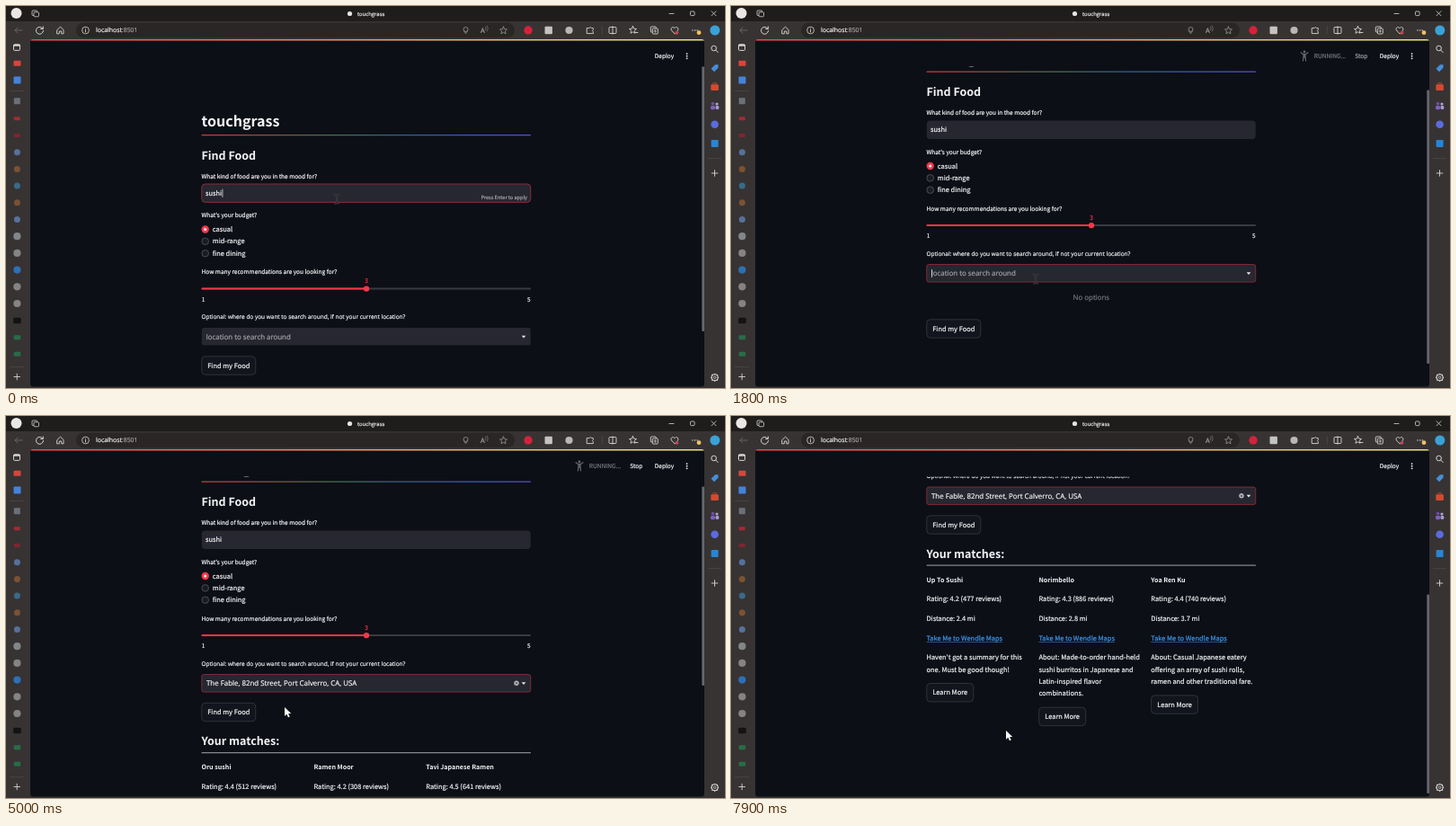
An HTML page with a canvas that plays this animation: 800x425 px, repeating every 8000 ms.

```html
<!DOCTYPE html>
<html lang="en">
<head>
<meta charset="utf-8">
<title>touchgrass</title>
<style>
html, body { margin: 0; width: 100%; height: 100%; overflow: hidden; background: #0c0f16; }
canvas { display: block; width: 800px; height: 425px; }
</style>
</head>
<body>
<canvas id="stage"></canvas>
<script>
const W = 800, H = 425, LOOP = 8000, STEP = 100;
const canvas = document.getElementById('stage');
const dpr = window.devicePixelRatio || 1;
canvas.width = W * dpr;
canvas.height = H * dpr;
const c = canvas.getContext('2d');

const BG = '#0c0f16', FIELD = '#262730', RED = '#f5374a', TEXT = '#f4f4f6', GREY = '#a3a5ab';
const FOCUS = '#a8303e', BAR = '#373333';
const LEFT = 217.5, WIDE = 366.5, VIEW_TOP = 38, VIEW = 387;

// ---------- drawing helpers ----------
function box(x, y, w, h, r, fill, stroke, lw = 1) {
  c.beginPath();
  c.roundRect(x, y, w, h, r);
  if (fill) { c.fillStyle = fill; c.fill(); }
  if (stroke) { c.strokeStyle = stroke; c.lineWidth = lw; c.stroke(); }
}
function dot(x, y, r, fill, stroke, lw = 1) {
  c.beginPath();
  c.arc(x, y, r, 0, Math.PI * 2);
  if (fill) { c.fillStyle = fill; c.fill(); }
  if (stroke) { c.strokeStyle = stroke; c.lineWidth = lw; c.stroke(); }
}
// Paths are SVG strings placed at x, y
function shape(d, x, y, fill, stroke, lw = 1) {
  c.save();
  c.translate(x, y);
  const p = new Path2D(d);
  c.lineJoin = c.lineCap = 'round';
  if (stroke) { c.strokeStyle = stroke; c.lineWidth = lw; c.stroke(p); }
  if (fill) { c.fillStyle = fill; c.fill(p); }
  c.restore();
}
// Text whose capitals are centred on y; regular weight gets a hairline to hold up at small sizes
function put(s, x, y, size, color, font, weight, align) {
  c.font = `${weight} ${size}px ${font}`;
  c.textAlign = align;
  c.fillStyle = c.strokeStyle = color;
  c.fillText(s, x, y);
  if (weight < 600) {
    c.lineWidth = 0.2;
    c.lineJoin = 'round';
    c.strokeText(s, x, y);
  }
}
function text(s, x, y, size = 7.98, color = TEXT, weight = 400, align = 'left') {
  put(s, x, y + size * 0.33, size / (weight < 600 ? 1.07 : 1.118), color,
    '"Noto Sans CJK JP", "Noto Sans CJK SC", sans-serif', weight, align);
}
function ui(s, x, y, size = 7.9, color = TEXT, align = 'left') {
  put(s, x, y + size * 0.35, size, color, '"Open Sans", "Noto Sans", sans-serif', 400, align);
}
function gradient(x, w, colors) {
  const g = c.createLinearGradient(x, 0, x + w, 0);
  colors.forEach((k, i) => g.addColorStop(i / (colors.length - 1), k));
  return g;
}
const clamp = u => Math.max(0, Math.min(1, u));
const ease = u => { u = clamp(u); return u * u * u * (u * (6 * u - 15) + 10); };

// ---------- content ----------
const QUERY = 'the fable';
const OPTIONS = [
  'The Fable, 82nd Street, Port Calverro, CA, USA',
  'The Fable Massage, Vanoti Road, Umber City, CA, USA',
  'The Fable Island, Orra, Velan',
  'The Fable Lounge, Thistle Hill Road, San Pelo, CA, USA'
];
const FIRST = [
  { name: 'Oru sushi', rate: '4.4 (512 reviews)' },
  { name: 'Ramen Moor', rate: '4.2 (308 reviews)' },
  { name: 'Tavi Japanese Ramen', rate: '4.5 (641 reviews)' }
];
const SECOND = [
  { name: 'Up To Sushi', rate: '4.2 (477 reviews)', far: '2.4',
    about: ["Haven't got a summary for this", 'one. Must be good though!'] },
  { name: 'Norimbello', rate: '4.3 (886 reviews)', far: '2.8',
    about: ['About: Made-to-order hand-held', 'sushi burritos in Japanese and', 'Latin-inspired flavor', 'combinations.'] },
  { name: 'Yoa Ren Ku', rate: '4.4 (740 reviews)', far: '3.7',
    about: ['About: Casual Japanese eatery', 'offering an array of sushi rolls,', 'ramen and other traditional fare.'] }
];

// ---------- timeline ----------
const AT = { focus: 1600, run: 1700, first: 2500, type: 2300, list: 4000, pick: 4900, second: 5800, scroll: 7250 };
const POINTER = [
  [0, 368, 215, 'beam'], [400, 368, 215, 'beam'], [700, 362, 238, 'arrow'], [900, 354, 271, 'hand'],
  [1200, 354, 271, 'arrow'], [1500, 339, 304, 'beam'], [3800, 339, 304, 'beam'], [4100, 337, 285, 'arrow'],
  [4400, 337, 285, 'arrow'], [4700, 310, 324, 'hand'], [5000, 310, 324, 'arrow'], [5400, 267, 338, 'hand'],
  [6900, 267, 338, 'hand'], [7200, 306, 350, 'arrow'], [LOOP, 306, 350, 'arrow']
];
function pointerAt(t) {
  let i = 0;
  while (i < POINTER.length - 2 && POINTER[i + 1][0] <= t) i++;
  const [t0, x0, y0, kind] = POINTER[i], [t1, x1, y1] = POINTER[i + 1];
  const u = ease((t - t0) / (t1 - t0));
  return { x: x0 + (x1 - x0) * u, y: y0 + (y1 - y0) * u, kind };
}
function stateAt(t) {
  const open = t >= AT.focus && t < AT.pick;
  const listed = open && t >= AT.list;
  const results = t < AT.first ? null : t < AT.second ? FIRST : SECOND;
  const push = listed ? 91.5 : open ? 29.5 : 0;
  return {
    open, listed, results, push,
    picked: t >= AT.pick,
    typed: QUERY.slice(0, Math.max(0, Math.floor((t - AT.type) / 130) + 1)),
    scroll: 70.5 * ease((t - 920) / 450) + 208.5 * ease((t - AT.scroll) / 500),
    height: results && !listed ? 673 + push : 461 + push,
    running: t >= AT.run && t < AT.second,
    faint: t < 2100,
    hover: t >= 5300 && t < 7000,
    caret: t < AT.type ? (t < AT.focus ? t : t - AT.focus) % 1000 < 500
         : t < 3500 || (t - 3400) % 1000 < 500
  };
}

// ---------- page ----------
function button(label, x, y, w, hot) {
  box(x + 0.25, y - 10.2, w, 20.4, 4, '#12151d', hot ? RED : '#3d3f48', 0.7);
  text(label, x + w / 2 + 0.25, y, 7.98, hot ? RED : TEXT, 400, 'center');
}
function caret(x, y) {
  box(x, y - 4.5, 0.7, 9, 0, TEXT);
}
function form(s, t) {
  text('touchgrass', LEFT, 128.5, 17.95, TEXT, 600);
  box(LEFT, 142.9, WIDE, 1.3, 0.5, gradient(LEFT, WIDE, ['#cc3b43', '#8c5440', '#48704f', '#33648f', '#3a5cbc', '#5c50c6']));
  text('Find Food', LEFT, 166, 13.96, TEXT, 600);

  const focused = t < AT.focus;
  text('What kind of food are you in the mood for?', LEFT, 189.3, 6.98);
  box(LEFT + 0.25, 198, WIDE - 0.5, 20.4, 4, FIELD, focused ? FOCUS : null, 0.8);
  text('sushi', 222, 208.2);
  if (focused) {
    text('Press Enter to apply', 580, 213.5, 5.98, GREY, 400, 'right');
    if (s.caret) caret(240.6, 208.2);
  }

  text("What's your budget?", LEFT, 232.8, 6.98);
  ['casual', 'mid-range', 'fine dining'].forEach((name, i) => {
    const y = 248.5 + i * 13.35;
    if (i) dot(221.7, y, 3.8, '#1a1c24', '#565861', 0.8);
    else { dot(221.7, y, 4.2, RED); dot(221.7, y, 1.5, '#fff'); }
    text(name, 229.8, y);
  });

  text('How many recommendations are you looking for?', LEFT, 296, 6.98);
  text('3', 401, 306, 6.98, RED, 400, 'center');
  box(LEFT, 313.6, WIDE, 2, 1, '#3a3b42');
  box(LEFT, 313.6, 183.5, 2, 1, RED);
  dot(401, 314.6, 3.2, RED);
  text('1', 217.8, 326.3, 6.98);
  text('5', 583.5, 326.3, 6.98, TEXT, 400, 'right');

  ui('Optional: where do you want to search around, if not your current location?', LEFT, 346.2, 6.48);
  box(LEFT + 0.25, 358, WIDE - 0.5, 19.6, 2.5, FIELD, s.open || s.picked ? FOCUS : null, 0.7);
  shape('M-2.3 -1.2H2.3L0 1.5Z', 576, 368, '#e8e8ea');
  if (s.picked) {
    ui(OPTIONS[0], 223, 368);
    dot(568, 367.8, 2.7, '#b9bac0');
    shape('M-1 -1L1 1M1 -1L-1 1', 568, 367.8, null, FIELD, 0.7);
  } else {
    ui(s.typed || 'location to search around', 222.8, 368, 7.9, s.typed ? TEXT : GREY);
    if (s.open && s.caret) caret(223 + (s.typed ? c.measureText(s.typed).width : 0), 368);
  }
  if (s.listed) {
    box(LEFT, 384.3, WIDE, 20.4, 0, FIELD);
    OPTIONS.forEach((o, i) => ui(o, 223.5, 394.6 + i * 20.8));
  } else if (s.open) {
    ui('No options', 400.8, 394.8, 7.9, '#777981', 'center');
  }
}
function matches(list, y) {
  text('Your matches:', LEFT, y + 32, 13.96, TEXT, 600);
  box(LEFT, y + 44.6, WIDE, 1.2, 0.5, '#85878f');
  list.forEach((m, i) => {
    const x = LEFT + i * 124.9;
    text(m.name, x, y + 61.3, 7.98, TEXT, 600);
    text('Rating: ' + m.rate, x, y + 82.8);
    if (!m.about) return;
    text(`Distance: ${m.far} mi`, x, y + 104.6);
    const link = 'Take Me to Wendle Maps';
    text(link, x, y + 126.3, 7.98, '#3b99f0');
    box(x, y + 129.9, c.measureText(link).width, 0.6, 0, '#3b99f0');
    m.about.forEach((line, k) => text(line, x, y + 147.8 + k * 13.35));
    button('Learn More', x, y + 160 + m.about.length * 13.35, 52);
  });
}
function runner(t) {
  const col = '#63656d';
  if (Math.floor(t / 300) % 2) {
    dot(634.5, 58, 3, null, col, 0.8);
    dot(641.7, 58, 3, null, col, 0.8);
    shape('M-3.2 2L-1 -2L1 0V3M-1 -2L2 -3L4 -1', 638, 55.5, null, col, 1.1);
    dot(639.8, 50.4, 1.3, col);
  } else {
    dot(638, 51, 1.4, col);
    shape('M-4 -2L-1.3 0H1.3L4 -2M0 0V3M-1 3L-1.6 7M1 3L1.6 7', 638, 53.8, null, col, 1.2);
    box(636.5, 53.5, 3, 4, 0.8, col);
  }
}
function page(s, t) {
  c.save();
  c.beginPath();
  c.roundRect(27, 37, 750, 386.5, 3);
  c.clip();
  c.fillStyle = BG;
  c.fillRect(27, 37, 750, 388);

  c.save();
  c.translate(0, -s.scroll);
  form(s, t);
  const y = 400 + s.push;
  button('Find my Food', LEFT, y, 60, s.hover);
  if (s.results) matches(s.results, y);
  c.restore();

  const ratio = s.height / VIEW;
  box(774.3, VIEW_TOP + s.scroll / ratio, 2.7, VIEW / ratio - 1, 1, '#65676c');

  c.fillStyle = BG;
  c.fillRect(27, 38, 750, 29.5);
  box(27, 37, 750, 1.4, 0, gradient(27, 750, ['#f2454d', '#f0785c', '#eeb868', '#e9e57a']));
  text('Deploy', 721.8, 55.6, 6.98);
  for (let i = -1; i < 2; i++) dot(757.6, 55.7 + i * 2.6, 0.9, TEXT);
  if (s.running) {
    runner(t);
    text('RUNNING...', 648.8, 55.6, 7.1, '#74767d');
    text('Stop', 694.2, 55.6, 6.98, s.faint ? '#a2a3a8' : TEXT);
  }
  c.restore();
}

// ---------- browser frame ----------
const PLUS = 'M-3.3 0H3.3M0 -3.3V3.3';
const STAR = 'M0 -4L1.2 -1.3L4 -1L1.9 .9L2.5 3.8L0 2.3L-2.5 3.8L-1.9 .9L-4 -1L-1.2 -1.3Z';
function chrome() {
  const ink = '#d6d4d4', dim = '#8f8c8c';
  c.fillStyle = BAR;
  c.fillRect(0, 0, W, H);
  c.fillStyle = '#1f1c1c';
  c.fillRect(0, 0, W, 17);

  // title bar
  dot(11.5, 8, 6, '#e9e6e4');
  box(29, 5, 5.5, 5.5, 1, null, ink, 0.8);
  box(31, 6.8, 5.5, 5, 1, '#1f1c1c', ink, 0.8);
  dot(382.5, 8.5, 2.6, '#e4e4e4');
  ui('touchgrass', 391, 8.5, 5.95, '#eeecec');
  shape('M-2.5 0H2.5', 740.5, 8.5, null, ink, 0.8);
  box(761.5, 6, 4.6, 4.6, 1, null, ink, 0.8);
  shape('M-2.5 -2.5L2.5 2.5M2.5 -2.5L-2.5 2.5', 787.5, 8.3, null, ink, 0.8);

  // toolbar
  shape('M4 0H-4M-1 -3L-4 0L-1 3', 14, 27, null, '#6d6969', 0.9);
  shape('M3.4 -1.8A4 4 0 1 0 4 .5M3.8 -4V-1.5H1.2', 37.5, 27, null, ink, 1);
  shape('M-3.5 -.5L0 -3.8L3.5 -.5V3.8H1.2V1H-1.2V3.8H-3.5Z', 60.5, 27, null, ink, 0.9);
  box(78, 18.8, 488, 16.4, 8, '#2a2626');
  dot(88.5, 27, 3.9, null, ink, 0.8);
  shape('M0 -.4V2M0 -2V-1.8', 88.5, 27, null, ink, 0.9);
  ui('localhost', 100, 27, 6.9, '#f1efef');
  ui(':8501', 100 + c.measureText('localhost').width, 27, 6.9, '#a09c9c');
  dot(511.5, 26, 2.5, null, dim, 0.9);
  shape('M-1.8 1.2L0 4L1.8 1.2', 511.5, 26.8, null, dim, 0.9);
  ui('A', 528, 27.5, 7.5, '#aaa7a7');
  shape('M0 -2Q1.5 0 0 2M1.8 -3Q4 0 1.8 3', 533.5, 25, null, dim, 0.6);
  shape(STAR, 553.5, 27, null, dim, 0.9);
  dot(581, 27, 4.7, '#d5223c');
  box(599.5, 22.8, 8.4, 8.4, 1, '#c4c2c2');
  dot(626.5, 27, 4.1, '#b9b6b6');
  shape('M-3.4 -2.4H-1A1.4 1.4 0 0 1 1.6 -2.4H3.3V-.6A1.4 1.4 0 0 0 3.3 1.7V3.6H-3.4Z', 650, 27, null, ink, 0.9);
  shape('M0 -4V4', 663.3, 27, null, '#524e4e', 0.7);
  box(671, 23.5, 8, 7, 1, null, ink, 0.9);
  shape('M0 -4.2V4.2', 675, 27, null, ink, 0.9);
  shape(STAR, 697.5, 26.5, null, ink, 0.9);
  shape('M0 0H3', 700, 29.5, null, ink, 0.9);
  box(717.3, 23, 6, 6, 1, null, ink, 0.9);
  box(719.3, 25, 6, 6, 1, BAR, ink, 0.9);
  shape('M-1.4 0H1.4M0 -1.4V1.4', 722.3, 28, null, ink, 0.7);
  shape('M0 3.8L-3.6 0C-5 -2.4 -2 -5 0 -2.3C2 -5 5 -2.4 3.6 0Z', 744, 27, null, ink, 0.9);
  dot(746.5, 29.8, 1.9, '#c54552');
  for (let i = 0; i < 3; i++) dot(764 + i * 2.6, 27, 0.75, ink);
  dot(771, 29.7, 2.4, '#f0c062');
  dot(788.8, 27, 5.5, '#3aa2d8');

  // left rail
  box(8.5, 42.8, 7, 6.6, 1, null, ink, 1);
  box(8.5, 42.8, 7, 2, 0.5, ink);
  box(8.5, 60.8, 8, 6, 1, '#d8453c');
  box(8.5, 78.6, 8, 8, 1, '#4383da');
  box(4, 94, 16, 0.6, 0, '#524e4e');
  box(8.8, 102.2, 7, 7, 0.5, '#6b7078');
  const marks = ['#a02b34', '#7f2530', '#56719a', '#7b5233', '#3a6a88', '#7b5233', '#56719a',
    '#818789', '#858383', '#2d70b5', '#858383', '#858383'];
  marks.forEach((k, i) => {
    const y = 125.3 + i * 18.7;
    if (i < 2) box(8.8, y - 2, 7, 4, 1, k);
    else dot(12.4, y, i > 6 ? 4.1 : 3.5, k);
  });
  box(8.2, 346.8, 8.6, 6.4, 1.5, '#131313');
  box(8.7, 366.3, 7.5, 5, 1, '#286c48');
  box(8.7, 384.8, 7.5, 5, 1, '#286c48');
  box(4, 401.5, 16, 0.6, 0, '#524e4e');
  shape(PLUS, 12.2, 412.5, null, ink, 0.9);

  // right rail
  dot(787.6, 47, 2.8, null, ink, 1);
  shape('M0 0L2.5 2.5', 789.7, 49.1, null, ink, 1);
  shape('M-4 .5L.5 -4H4V-.5L-.5 4Z', 788.5, 69.3, '#448fd9');
  box(784.3, 87.2, 8.6, 6.8, 1, '#d3492f');
  box(786.7, 85.6, 3.8, 2, 0.6, null, '#d3492f', 0.8);
  dot(786.5, 108.6, 1.9, '#6a4fa7');
  dot(791, 109, 1.6, '#b0a2d1');
  box(784, 111, 5, 4.2, 1.4, '#7e62bd');
  box(789.5, 111, 3.8, 4, 1.4, '#aa9bd0');
  dot(788.6, 131.8, 4.3, '#5b6bdc');
  box(784.6, 149, 8, 8, 1, '#2884d4');
  box(781, 169.5, 15, 0.6, 0, '#524e4e');
  shape(PLUS, 788.5, 186, null, ink, 0.9);
  dot(788.6, 413.3, 3.5, null, ink, 1.1);
  for (let i = 0; i < 8; i++) {
    const a = i * Math.PI / 4;
    dot(788.6 + Math.cos(a) * 4, 413.3 + Math.sin(a) * 4, 0.65, ink);
  }
  dot(788.6, 413.3, 1.3, null, ink, 0.8);
}

// ---------- pointer ----------
const HAND = 'M-2 -5.5Q-1 -6.8 0 -5.5V-1.5L3.6 -.6Q4.8 0 4.5 1.5L3.6 5.8H-1.6L-4.6 1.8Q-4.8 .2 -3.2 .8L-2 1.8Z';
const ARROW = 'M0 0V9.8L2.3 7.7L4 11.3L5.7 10.5L4.1 7H7.2Z';
const BEAM = 'M-2.2 -4.6Q0 -4.6 0 -3.6Q0 -4.6 2.2 -4.6M0 -3.6V3.6M-2.2 4.6Q0 4.6 0 3.6Q0 4.6 2.2 4.6';
function pointer({ x, y, kind }) {
  if (kind === 'beam') {
    shape(BEAM, x, y, null, '#6c6e74', 1.6);
    shape(BEAM, x, y, null, '#050506', 0.9);
  } else {
    shape(kind === 'hand' ? HAND : ARROW, x, y, '#fff', '#111', 1);
    if (kind === 'hand') shape('M1.2 -1V1M2.8 -.6V1.2', x, y, null, '#555', 0.4);
  }
}

function draw(t) {
  c.setTransform(dpr, 0, 0, dpr, 0, 0);
  c.textRendering = 'geometricPrecision';
  chrome();
  page(stateAt(t), t);
  pointer(pointerAt(t));
}

const start = performance.now();
function tick(now) {
  const t = Math.max(0, now - start) % LOOP;
  draw(Math.floor(t / STEP) * STEP);
  requestAnimationFrame(tick);
}
draw(0);
requestAnimationFrame(tick);
</script>
</body>
</html>
```
